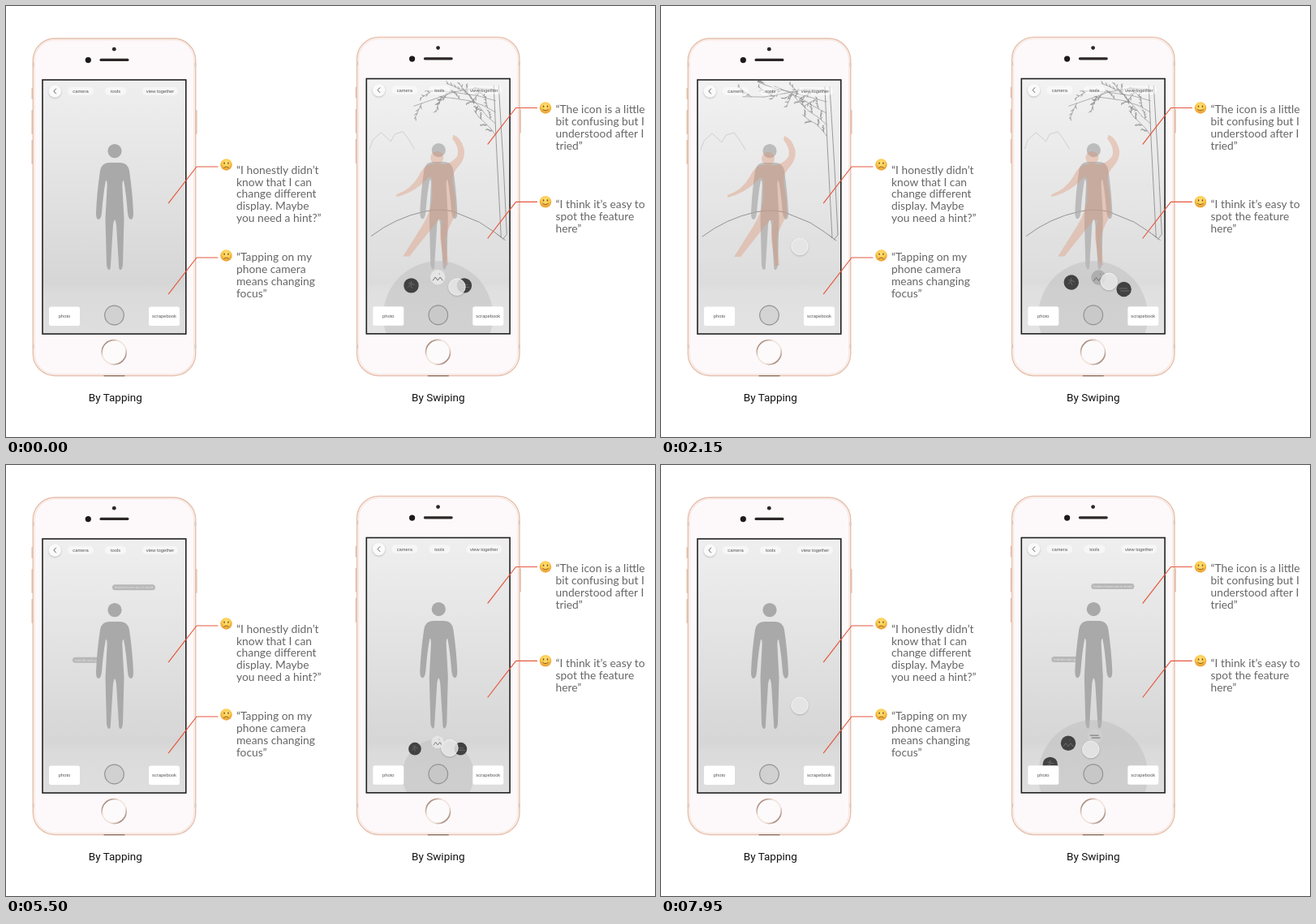
An HTML page that plays this animation: 800 by 531 pixels, repeating every 8000 ms.

```html
<!DOCTYPE html>
<html lang="en">
<head>
<meta charset="utf-8">
<title>Tapping and swiping</title>
<style>
html, body { margin: 0; width: 100%; height: 100%; overflow: hidden; background: #fff; }
svg { display: block; width: 100%; height: 100%; }
.quote { font: 13.8px Lato, sans-serif; fill: #666; }
.caption { font: 13.5px Roboto, sans-serif; fill: #111; text-anchor: middle; }
.ui { font: 5.8px "Liberation Sans", sans-serif; fill: #555; text-anchor: middle; }
.tag { font: 4px "Liberation Sans", sans-serif; fill: #e6e6e6; }
.line { fill: none; stroke-linecap: round; stroke-linejoin: round; }
.dotted { stroke-dasharray: .1 3.7; }
</style>
</head>
<body>
<svg id="stage" viewBox="0 0 800 531" xmlns="http://www.w3.org/2000/svg"></svg>
<script>
const LOOP = 8000, STEP = 35, TURN = 32;
const SWIPE_PLACE = "translate(399.3 -1.8) scale(1 1.004)";
const stage = document.getElementById("stage");
const $ = id => document.getElementById(id);

let seed = 11;
const rand = () => (seed = seed * 16807 % 2147483647) / 2147483647;
const lerp = (a, b, p) => a + (b - a) * p;

// Eased step from 0 to 1, and a window that fades in and out again
function ramp(t, from, span = 250) {
  const p = Math.min(1, Math.max(0, (t - from) / span));
  return p * p * (3 - 2 * p);
}
const between = (t, from, to) => ramp(t, from) - ramp(t, to);

const rect = (x, y, w, h, r, fill, more = "") =>
  `<rect x="${x}" y="${y}" width="${w}" height="${h}" rx="${r}" fill="${fill}" ${more}/>`;
const circle = (x, y, r, fill, more = "") => `<circle cx="${x}" cy="${y}" r="${r}" fill="${fill}" ${more}/>`;
const line = (d, color, w, cls = "") => `<path class="line ${cls}" d="${d}" stroke="${color}" stroke-width="${w}"/>`;
const text = (cls, x, y, s) => `<text class="${cls}" x="${x}" y="${y}">${s}</text>`;

// Crooked branch that throws off shorter side branches
function branch(x, y, angle, len, depth) {
  let d = "";
  for (let i = 0; i < 4; i++) {
    const ex = x + len * Math.cos(angle), ey = Math.max(93, y + len * Math.sin(angle));
    d += `M${x.toFixed(1)} ${y.toFixed(1)}L${ex.toFixed(1)} ${ey.toFixed(1)}`;
    if (depth) {
      const side = rand() < .5 ? -1 : 1;
      d += branch(lerp(x, ex, .6), lerp(y, ey, .6), angle + side * (.5 + rand() * .4), len * .2, depth - 1);
    }
    [x, y] = [ex, ey];
    angle += (rand() - .5) * .5;
  }
  return d;
}

function tree() {
  let d = "";
  for (let i = 0; i < 5; i++) d += branch(204, 104 + i * 14, Math.PI + .05 + i * .22, 26 - i * 4, 2);
  return line(d, "#8f8f8f", .65) +
    line("M202 100L205 170L211 286L207 282M208 100L214 200L218 282L213 288", "#858585", .8);
}

const HALF = "M134.4 193H127Q118 193 116 203Q112 230 111 255Q111 263 114 263Q117 263 118 255Q120 230 123 215Q125 214 124.5 224L122.5 262L124 319Q125 325 127 325Q129 325 129 319L132 270Q133 263 134.4 263Z";
const DANCER = "M152 160Q161 163 165 176Q168 187 159 198Q151 206 151 216Q156 242 155 258Q143 278 143 290L146 320H141L136 288Q135 278 139 264H134L98 309H90L114 271Q122 259 126 240V216Q125 208 119 215Q103 231 82 236V233Q100 227 109 211Q115 198 124 196H141Q151 194 157 186Q160 176 151 165Z";

const scene = () => rect(45, 91, 177, 313, 0, "#fff", 'opacity=".15"') +
  line("M49 177L53 166L63 157L75 168L80 159L90 156L96 164L104 177", "#c3c3c3", .7) +
  line("M51 284Q80 262 116 254Q136 250 152 254L184 267Q202 278 216 289", "#858585", .85) + tree();

const dancer = () => `<g fill="#dc8f6d" opacity=".37">${circle(132, 188, 8, "#dc8f6d")}<path d="${DANCER}"/></g>`;

const dots = () =>
  line(DANCER, "#555", 1.15, "dotted") + line("M53 260.5H217", "#555", 1.25, "dotted") +
  line("M125 184a8 8 0 1 1 16 0a8 8 0 1 1 -16 0", "#555", 1.1, "dotted") +
  line("M130 179L136 186M136 179L130 186", "#333", .9);

const tag = (x, y, w, s) => rect(x, y, w, 7, 3.5, "#b8b8b8") + text("tag", x + 3, y + 5, s);
const tags = () => tag(131, 147.3, 53, "bottom leaves are in shade") + tag(82, 236.8, 34, "hold the arm up");

const pill = (x, w, s) => rect(x - w / 2, 100, w, 10, 5, "#fff", 'opacity=".5"') + text("ui", x, 107, s);
const button = (x, s) => rect(x - 19, 370.5, 38, 23.5, 2.5, "#fff") + text("ui", x, 384.3, s);

const controls = () =>
  circle(133.5, 381, 11.8, "#bbb", 'fill-opacity=".35" stroke="#929292" stroke-width="1.2"') +
  circle(60.3, 105, 7.6, "#fafafa", 'filter="url(#soft)"') + line("M61.6 102L58.8 105L61.6 108", "#555", .9) +
  pill(92, 32, "camera") + pill(135, 26, "tools") + pill(190, 44, "view together") +
  button(72, "photo") + button(195, "scrapebook");

function body() {
  const key = (x, y, h) => rect(x, y, 2, h, 1, "#e3c3b3");
  let s = key(31.4, 101, 14) + key(31.4, 128, 30) + key(31.4, 165, 30) + key(233.6, 128, 30) +
    rect(33.3, 40, 200.4, 415.5, 27, "#fdf9fb", 'stroke="#e6bfab" stroke-width="1.4"') +
    rect(35.2, 41.9, 196.6, 411.7, 25.4, "none", 'stroke="#f7e8e1" stroke-width="1.4"');
  for (const x of [32.6, 232.4]) for (const y of [70, 417]) s += rect(x, y, 2, 5, 0, "#dcc8be");
  return s + line("M121 455.6H146", "#86695c", 1.4) +
    circle(133.3, 53.2, 2.4, "#2c2626") + circle(101.3, 66.6, 3.6, "#1d1a1a") +
    rect(115.5, 64.8, 36, 3.2, 1.6, "#2c2626") +
    circle(133.2, 426.6, 15, "#fdfafb", 'stroke="url(#ring)" stroke-width="1.7"');
}

function phone(id, place, extra) {
  const layer = (name, s) => `<g id="${id}-${name}">${s}</g>`;
  const man = circle(134, 178.6, 8.6, "#a9a9a9") +
    `<path d="${HALF}"/><path d="${HALF}" transform="matrix(-1 0 0 1 268 0)"/>`;
  return `<g transform="${place}">${body()}<g clip-path="url(#screen)">` +
    rect(45, 91, 177, 313, 0, "url(#wall)") + layer("scene", scene()) + layer("tags", tags()) +
    layer("man", `<g fill="#a9a9a9">${man}</g>`) + layer("dancer", dancer()) + layer("dots", dots()) +
    extra + controls() + `</g>${rect(45, 91, 176.8, 313, 0, "none", 'stroke="#222" stroke-width="1.6"')}</g>`;
}

const GLYPHS = [
  "M-4 2L-1 -1L1 3M0 -5V-3M-3 -3L4 -1",
  "M-6 4L-3 0L0 4L3 0L6 4M2 -4h.1",
  "M-6 -1H4M-4 2H6"
];
const dial = circle(133.3, 382.3, 67.5, "#b7b7b7", 'opacity=".42" id="disc"') +
  GLYPHS.map((g, i) => `<g id="icon${i}">${circle(0, 0, 9.2, "#444")}${line(g, "#666", .9)}</g>`).join("");

const touch = id => `<g id="${id}">${circle(0, 0, 10.2, "#ebebeb", 'fill-opacity=".8" stroke="#f5f5f5" stroke-width=".8" filter="url(#soft)"')}</g>`;

const emoji = (x, y, sad) => `<g transform="translate(${x} ${y})">` + circle(0, 0, 7.2, "url(#face)") +
  line("M-2.4 -2.2v.8M2.4 -2.2v.8", "#7a5426", 1.6) +
  line(sad ? "M-2.8 3.8Q0 1 2.8 3.8" : "M-3.4 2Q0 4.8 3.4 2", "#7a5426", .9) + "</g>";

const note = (x, y, sad, textY, lines) =>
  line(`M${x} ${y + 44.7}L${x + 34.5} ${y}H${x + 60.5}`, "#e4593f", 1.2) +
  emoji(x + 71, y - (sad ? 2.5 : 0), sad) +
  lines.split("|").map((s, i) => text("quote", x + 83.5, textY + i * 14.9, s)).join("");

stage.innerHTML = `<defs>
  <clipPath id="screen"><rect x="45" y="91" width="177" height="313"/></clipPath>
  <linearGradient id="wall" x2="0" y2="1">
    <stop offset="0" stop-color="#efefef"/><stop offset=".3" stop-color="#e6e6e6"/>
    <stop offset=".8" stop-color="#d6d6d6"/><stop offset=".84" stop-color="#dbdbdb"/><stop offset="1" stop-color="#dedede"/>
  </linearGradient>
  <linearGradient id="ring" x2="1" y2="1">
    <stop offset="0" stop-color="#76513f"/><stop offset=".35" stop-color="#f3e4dc"/>
    <stop offset=".65" stop-color="#f3e4dc"/><stop offset="1" stop-color="#76513f"/>
  </linearGradient>
  <radialGradient id="face" cy=".35"><stop offset="0" stop-color="#ffe37c"/><stop offset=".7" stop-color="#fdcc4d"/><stop offset="1" stop-color="#efa83a"/></radialGradient>
  <filter id="soft" x="-40%" y="-40%" width="180%" height="190%"><feDropShadow dx="0" dy="1" stdDeviation="1.2" flood-opacity=".25"/></filter>
</defs>` +
  phone("tap", "", "") + phone("swipe", SWIPE_PLACE, dial) + touch("tapTouch") + touch("swipeTouch") +
  note(200.5, 198, true, 206.6, "“I honestly didn’t|know that I can|change different|display. Maybe|you need a hint?”") +
  note(200.5, 310, true, 314.2, "“Tapping on my|phone camera|means changing|focus”") +
  note(594, 125.5, false, 132.2, "“The icon is a little|bit confusing but I|understood after I|tried”") +
  note(594, 241.3, false, 249.2, "“I think it’s easy to|spot the feature|here”") +
  text("caption", 134.8, 487, "By Tapping") + text("caption", 532.8, 487, "By Swiping");

function show(id, v) {
  $(id).style.opacity = v;
  $(id).style.display = v > 0 ? "" : "none";
}

function pose(id, scene, dots, tags) {
  show(id + "-scene", scene);
  show(id + "-dancer", scene);
  show(id + "-man", 1 - .3 * scene);
  show(id + "-dots", dots);
  show(id + "-tags", tags);
}

function place(id, x, y, size = 1) {
  $(id).setAttribute("transform", `translate(${x} ${y}) scale(${size})`);
}

function turnDial(open, turn) {
  const r = lerp(44.5, 57, open), cy = lerp(400.5, 391.5, open), gap = lerp(27.4, STEP, open);
  const grey = v => `rgb(${v},${v},${v})`;
  $("disc").setAttribute("r", 67.5 * open);
  GLYPHS.forEach((_, i) => {
    const a = (i - 1) * gap + turn, rad = a * Math.PI / 180;
    const light = Math.max(0, 1 - Math.abs(a) / 22), icon = $("icon" + i);
    place("icon" + i, 132.9 + r * Math.sin(rad), cy - r * Math.cos(rad), lerp(.57, 1, open));
    icon.firstChild.setAttribute("fill", grey(Math.round(lerp(66, 229, light))));
    icon.lastChild.setAttribute("stroke", grey(Math.round(lerp(112, 95, light))));
  });
}

function drawTap(t) {
  pose("tap", between(t, 1000, 2750), between(t, 2750, 3900), between(t, 3900, 5600));
  place("tapTouch", 171, 296.3);
  show("tapTouch", between(t, 500, 4520) + ramp(t, 7700));
}

function drawSwipe(t) {
  const dots = between(t, 1150, 1850), tags = ramp(t, 7150), closed = between(t, 2900, 5550);
  pose("swipe", Math.max(0, 1 - dots - tags - closed), dots, tags);

  const open = 1 - between(t, 2850, 5350);
  const turn = TURN * (ramp(t, 900, 550) - ramp(t, 1600, 800) - ramp(t, 6950, 650));
  turnDial(open, turn);

  // The finger rests right of the middle icon, then moves along with the dial
  const rest = 1 - between(t, 500, 5700) - ramp(t, 6600);
  place("swipeTouch",
    lerp(545, 548 + .57 * turn + 8 * rest, open),
    lerp(372, 336 + .45 * Math.abs(turn) + 10 * rest, open));
  show("swipeTouch", 1 - between(t, 3400, 5000));
}

const start = performance.now();
function frame(now) {
  const t = Math.max(0, now - start) % LOOP;
  drawTap(t);
  drawSwipe(t);
  requestAnimationFrame(frame);
}
frame(start);
</script>
</body>
</html>
```
